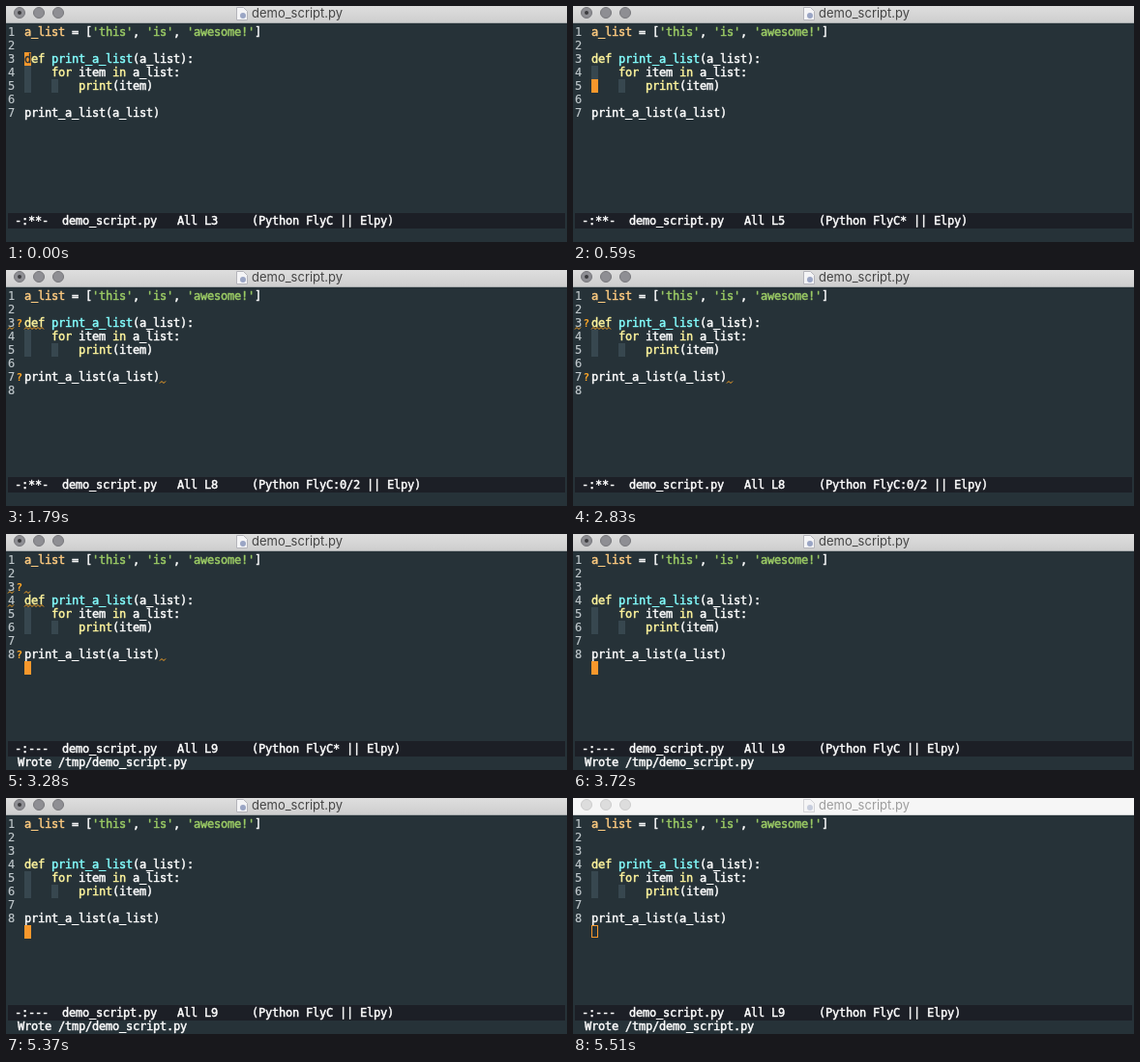
An HTML page with a canvas that plays this animation: 580x245 px, repeating every 5.61 s.

```html
<!DOCTYPE html>
<html lang="en">
<head>
<meta charset="utf-8">
<title>Editor session</title>
<style>
html, body { margin: 0; width: 100%; height: 100%; overflow: hidden; background: #263238; }
canvas { display: block; }
</style>
</head>
<body>
<canvas id="stage" width="580" height="245"></canvas>
<script>
const ctx = document.getElementById('stage').getContext('2d');
const LOOP = 5610, CELL = 7, ROW = 14, TOP = 20, LEFT = 19;
const COLOR = {
  back: '#263238', bar: '#1c1f26', indent: '#37474f', text: '#ffffff', number: '#c0c8cc',
  cursor: '#f8982c', warning: '#ffa726', match: '#81d4fa',
  keyword: '#fff59d', name: '#84ffff', variable: '#ffcc80', string: '#9ccc65'
};

const code = {
  assign: [['variable', 'a_list'], ['text', ' = ['], ['string', "'this'"], ['text', ', '],
    ['string', "'is'"], ['text', ', '], ['string', "'awesome!'"], ['text', ']']],
  def: [['keyword', 'def'], ['text', ' '], ['name', 'print_a_list'], ['text', '(a_list):']],
  loop: [['text', '    '], ['keyword', 'for'], ['text', ' item '], ['keyword', 'in'], ['text', ' a_list:']],
  print: [['text', '        '], ['keyword', 'print'], ['text', '(item)']],
  call: [['text', 'print_a_list(a_list)']]
};

// Each step changes some fields of the editor state from its time on.
const steps = [
  [0, { cursor: [3, 0], line: 3, check: '', saved: false, warnings: 0, match: false, visible: true, active: true }],
  [300, { cursor: [4, 0], line: 4 }],
  [440, { cursor: [5, 0], line: 5 }],
  [590, { check: '*' }],
  [740, { cursor: [6, 0], line: 6 }],
  [890, { cursor: [7, 20], line: 7 }],
  [1040, { match: true }],
  [1340, { cursor: [8, 0], line: 8, match: false, warnings: 1 }],
  [1790, { warnings: 2, check: ':0/2', visible: false }],
  [2240, { visible: true }],
  [2830, { visible: false }],
  [3280, { cursor: [9, 0], line: 9, check: '*', saved: true, visible: true }],
  [3720, { warnings: 0, check: '' }],
  [3870, { check: '*', visible: false }],
  [4320, { check: '', visible: true }],
  [4770, { visible: false }],
  [5370, { visible: true }],
  [5510, { active: false }]
];

const stateAt = time => Object.assign({}, ...steps.filter(([start]) => start <= time).map(step => step[1]));
const rowY = row => TOP + (row - 1) * ROW;
const colX = col => LEFT + col * CELL;

function box(x, y, width, height, color) {
  ctx.fillStyle = color;
  ctx.fillRect(x, y, width, height);
}

// Draws monospaced text on whole-pixel cells, slightly emboldened.
function mono(text, x, top, color, weight = 0.45) {
  ctx.font = '12px "DejaVu Sans Mono", monospace';
  ctx.textAlign = 'left';
  ctx.fillStyle = ctx.strokeStyle = color;
  ctx.lineWidth = weight;
  [...text].forEach((char, i) => {
    ctx.fillText(char, x + i * CELL, top + 11);
    ctx.strokeText(char, x + i * CELL, top + 11);
  });
}

function codeLine(parts, row) {
  let x = LEFT;
  for (const [kind, text] of parts) {
    mono(text, x, rowY(row), COLOR[kind]);
    x += text.length * CELL;
  }
}

function wave(x, row, cells) {
  const y = rowY(row) + 11.5;
  ctx.beginPath();
  for (let i = 0; i <= cells * CELL; i += 2) ctx.lineTo(x + i, y + (i % 4 ? 0 : 2));
  ctx.strokeStyle = COLOR.warning;
  ctx.lineWidth = 1;
  ctx.stroke();
}

function questionMark(row) {
  ctx.font = 'bold 11px "DejaVu Sans Mono", monospace';
  ctx.textAlign = 'left';
  ctx.fillStyle = COLOR.warning;
  ctx.fillText('?', 10.5, rowY(row) + 11);
}

function circle(x, y, radius, fill, stroke) {
  ctx.beginPath();
  ctx.arc(x, y, radius, 0, 2 * Math.PI);
  ctx.fillStyle = fill;
  ctx.fill();
  if (!stroke) return;
  ctx.strokeStyle = stroke;
  ctx.lineWidth = 1;
  ctx.stroke();
}

function titleBar(active) {
  const shade = ctx.createLinearGradient(0, 0, 0, 17);
  shade.addColorStop(0, active ? '#dedede' : '#f6f6f6');
  shade.addColorStop(1, active ? '#cecece' : '#f6f6f6');
  box(0, 0, 580, 17, shade);
  box(0, 17, 580, 1, active ? '#a9adaf' : '#cfd1d2');
  for (const x of [14, 34, 54]) circle(x, 7, 5.5, active ? '#8e8e93' : '#dddddd', active ? '#77777b' : '#cccccc');
  if (active) circle(14, 7, 2, '#3b3b3f');

  ctx.globalAlpha = active ? 1 : 0.5;
  ctx.beginPath();
  for (const [x, y] of [[238.5, 1.5], [245.5, 1.5], [249.5, 5.5], [249.5, 14.5], [238.5, 14.5]]) ctx.lineTo(x, y);
  ctx.closePath();
  ctx.fillStyle = '#f4f4f6';
  ctx.fill();
  ctx.strokeStyle = '#b4b4ba';
  ctx.lineWidth = 1;
  ctx.stroke();
  circle(245, 10, 3, '#9aa5c4');
  ctx.font = '13px Inter, sans-serif';
  ctx.textAlign = 'center';
  ctx.fillStyle = '#454545';
  ctx.fillText('demo_script.py', 301, 12);
  ctx.globalAlpha = 1;
}

function drawWarnings({ warnings, saved }) {
  if (!warnings) return;
  questionMark(3);
  wave(2, 3, 1);
  wave(LEFT, 3, saved ? 1 : 3);
  if (saved) {
    wave(2, 4, 1);
    wave(LEFT, 4, 3);
  }
  if (warnings > 1) {
    const last = saved ? 8 : 7;
    questionMark(last);
    wave(colX(20), last, 1);
  }
}

function drawCursor({ cursor: [row, col], visible, active }) {
  if (!visible) return;
  const x = colX(col), y = rowY(row);
  if (active) {
    box(x, y, CELL, ROW, COLOR.cursor);
    if (row === 3) mono('d', x, y, COLOR.back);
  } else {
    ctx.strokeStyle = COLOR.cursor;
    ctx.lineWidth = 1;
    ctx.strokeRect(x + 0.5, y + 0.5, CELL - 1, ROW - 2);
  }
}

function draw(time) {
  const state = stateAt(time);
  const shift = state.saved ? 1 : 0;
  box(0, 0, 580, 245, COLOR.back);
  titleBar(state.active);

  const lastNumber = state.line >= 8 ? 8 : 7;
  for (let n = 1; n <= lastNumber; n++) mono(String(n), 2, rowY(n), COLOR.number, 0.15);
  box(colX(0), rowY(4 + shift), CELL, 2 * ROW, COLOR.indent);
  box(colX(4), rowY(5 + shift), CELL, ROW, COLOR.indent);
  codeLine(code.assign, 1);
  codeLine(code.def, 3 + shift);
  codeLine(code.loop, 4 + shift);
  codeLine(code.print, 5 + shift);
  codeLine(code.call, 7 + shift);

  if (state.match) {
    for (const [col, char] of [[12, '('], [19, ')']]) {
      box(colX(col), rowY(7), CELL, ROW, COLOR.match);
      mono(char, colX(col), rowY(7), COLOR.indent);
    }
  }
  drawWarnings(state);
  drawCursor(state);

  box(2, 215, 576, 16, COLOR.bar);
  const flag = state.saved ? '---' : '**-';
  mono(` -:${flag}  demo_script.py   All L${state.line}     (Python FlyC${state.check} || Elpy)`, 2, 216, COLOR.text);
  if (state.saved) mono('Wrote /tmp/demo_script.py', 12, 230, COLOR.text);
}

function tick() {
  draw(performance.now() % LOOP);
  requestAnimationFrame(tick);
}
tick();
</script>
</body>
</html>
```
